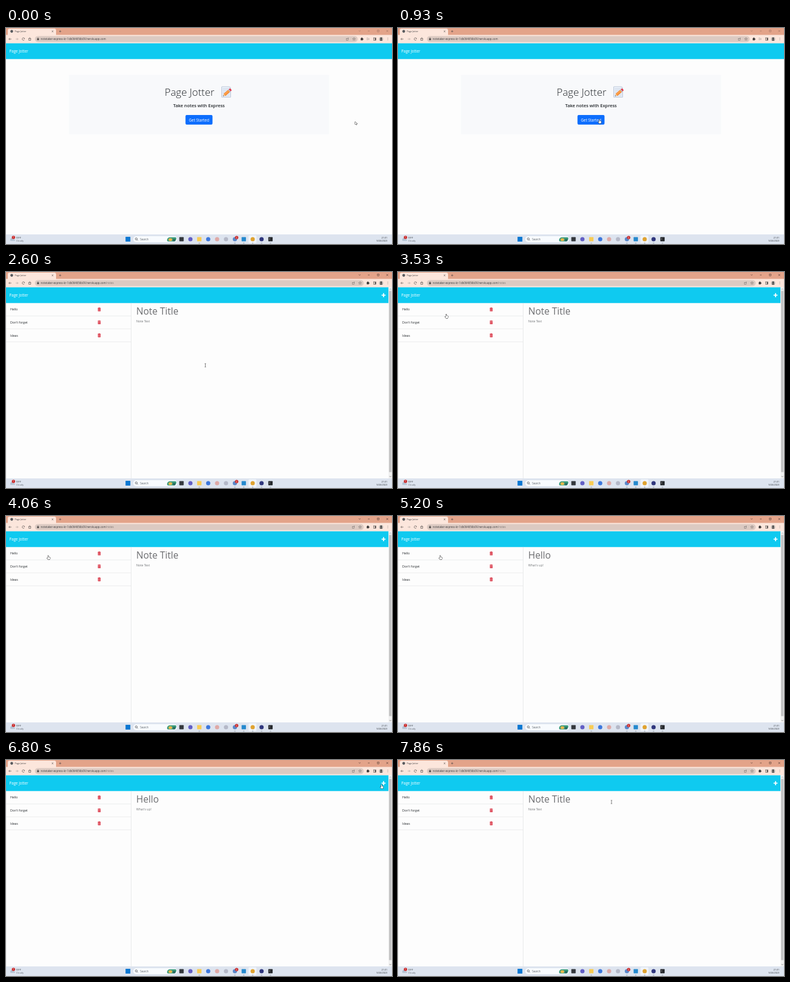
Animation, 640 px wide and 360 px high, one loop 8000 ms. Source, as an HTML page with a canvas:

```html
<!DOCTYPE html>
<html lang="en">
<head>
<meta charset="utf-8">
<title>Page Jotter</title>
<style>
html, body { margin: 0; width: 100%; height: 100%; overflow: hidden; background: #fdfdfd; }
canvas { display: block; width: 640px; height: 360px; }
</style>
</head>
<body>
<canvas id="stage"></canvas>
<script>
const canvas = document.getElementById('stage');
const ctx = canvas.getContext('2d');
const scale = Math.max(1, window.devicePixelRatio || 1);
canvas.width = 640 * scale;
canvas.height = 360 * scale;

const LOOP = 8000, FOCUS_AT = 1260, NAV_AT = 1400, OPEN_AT = 4730, CLEAR_AT = 7200;
const APP = 'Page Jotter';
const INK = '#3d3d3f', ICON = '#4a4645', CYAN = '#0fcaf0';
const START = { x: 579, y: 156 };
const moves = [
  { from: 330, to: 930, x: 334, y: 152.5 },
  { from: 1260, to: 2000, x: 330.5, y: 155.5 },
  { from: 2600, to: 3530, x: 80, y: 70.5 },
  { from: 3530, to: 4060, x: 70, y: 66 },
  { from: 5200, to: 6660, x: 622.5, y: 41 },
  { from: 7400, to: 7860, x: 354, y: 70 }
];

const clamp = p => Math.min(1, Math.max(0, p));
const ease = p => p * p * (3 - 2 * p);

function pointerAt(t) {
  return moves.reduce((at, m) => {
    const e = ease(clamp((t - m.from) / (m.to - m.from)));
    return { x: at.x + (m.x - at.x) * e, y: at.y + (m.y - at.y) * e };
  }, START);
}

function rect(x, y, w, h, color, r = 0) {
  ctx.fillStyle = color;
  ctx.beginPath();
  ctx.roundRect(x, y, w, h, r);
  ctx.fill();
}

function box(x, y, size, color) {
  ctx.strokeStyle = color;
  ctx.lineWidth = 0.6;
  ctx.strokeRect(x - size / 2, y - size / 2, size, size);
}

function disc(x, y, r, color) {
  ctx.fillStyle = color;
  ctx.beginPath();
  ctx.arc(x, y, r, 0, 7);
  ctx.fill();
}

function ring(x, y, r, color, from = 0, to = 7) {
  ctx.strokeStyle = color;
  ctx.lineWidth = 0.65;
  ctx.beginPath();
  ctx.arc(x, y, r, from, to);
  ctx.stroke();
}

function line(x1, y1, x2, y2, color, w = 0.6) {
  ctx.strokeStyle = color;
  ctx.lineWidth = w;
  ctx.beginPath();
  ctx.moveTo(x1, y1);
  ctx.lineTo(x2, y2);
  ctx.stroke();
}

// A right angle opening away from the direction it points in
function chevron(x, y, size, angle, color) {
  for (const side of [-1, 1]) {
    const a = angle + Math.PI + side * Math.PI / 4;
    line(x, y, x + size * Math.cos(a), y + size * Math.sin(a), color);
  }
}

function plus(x, y, r, color, w) {
  line(x - r, y, x + r, y, color, w);
  line(x, y - r, x, y + r, color, w);
}

function cross(x, y, r, color) {
  line(x - r, y - r, x + r, y + r, color);
  line(x - r, y + r, x + r, y - r, color);
}

function star(x, y, r, color) {
  ctx.beginPath();
  for (let i = 0; i < 10; i++) {
    const a = (i / 5 - 0.5) * Math.PI, d = i % 2 ? r * 0.45 : r;
    ctx.lineTo(x + d * Math.cos(a), y + d * Math.sin(a));
  }
  ctx.closePath();
  ctx.strokeStyle = color;
  ctx.lineWidth = 0.5;
  ctx.stroke();
}

function text(s, x, y, size, color, weight = 400, align = 'left') {
  ctx.font = `${weight} ${size}px "Open Sans", "Noto Sans", sans-serif`;
  ctx.textAlign = align;
  ctx.fillStyle = color;
  ctx.fillText(s, x, y);
}

function drawTabs(focused) {
  const c = focused ? '#40302a' : '#9b6f5e';
  rect(0, 0, 640, 12, '#e3a389');
  rect(3, 1, 80, 11, '#fce6dc', [3, 3, 0, 0]);
  disc(9.5, 5.6, 2.3, '#56595d');
  text(APP, 14.5, 7.1, 3.75, INK);
  cross(77.2, 5.6, 1.3, ICON);
  plus(89.8, 5.6, 1.8, ICON, 0.6);
  chevron(586.3, 5.6, 2.1, Math.PI / 2, c);
  line(600, 5, 603, 5, c);
  box(617.2, 5, 2.7, c);
  cross(632.2, 5, 1.5, c);
}

function drawToolbar(notes) {
  const y = 18.4;
  rect(0, 11.5, 640, 14, '#fce6dc');
  line(5, y, 9, y, ICON);
  chevron(4.7, y, 2.6, Math.PI, ICON);
  line(16, y, 20, y, '#a99f9b');
  chevron(20.1, y, 2.6, 0, '#a99f9b');
  ring(28.8, y, 2, ICON, 0.5, 5.5);
  disc(30.5, 17.4, 0.7, ICON);
  box(39.4, 19.2, 3, ICON);
  chevron(39.4, 16, 3.2, -Math.PI / 2, ICON);

  const end = notes ? 593 : 583;
  rect(48, 13.4, end - 48, 10, '#dccac2', 5);
  ring(53.1, 17.6, 1.1, ICON, Math.PI, 0);
  rect(51.6, 17.6, 3, 2.6, ICON, 0.4);
  const host = 'notetaker-express-kr-1db064656b09.herokuapp.com';
  text(host, 57.5, 20, 4.4, INK);
  if (notes) text('/notes', 57.5 + ctx.measureText(host).width, 20, 4.4, '#7c7572');
  box(end - 17.3, 19, 3, '#77716f');
  chevron(end - 15, 17, 1.6, 0, '#77716f');
  star(end - 6, y, 2.5, '#625d5b');

  const px = end + 7;
  rect(px - 1.9, 16.8, 3.7, 3.7, '#3e3a39', 0.4);
  disc(px, 16.6, 0.8, '#3e3a39');
  disc(px + 1.9, 18.6, 0.8, '#3e3a39');
  if (!notes) {
    for (let i = 0; i < 3; i++) line(598, 16.7 + i * 1.5, 600.3, 16.7 + i * 1.5, '#85807e', 0.5);
    line(601.7, 16.8, 601.7, 20, '#85807e');
  }
  box(611.3, 18.5, 3.8, ICON);
  rect(611.6, 16.6, 1.6, 3.8, ICON);
  disc(622, y, 3.3, '#b9b4b0');
  disc(622, 17.3, 1.3, '#2e2b2b');
  rect(620, 18.9, 4, 1.9, '#2e2b2b', [2, 2, 0, 0]);
  for (let i = -1; i < 2; i++) disc(633, y + i * 1.7, 0.45, ICON);
}

function drawMemo() {
  rect(357.3, 97.5, 15.5, 18.3, '#a5b3c9', [1, 4, 1, 1]);
  rect(357.9, 98.1, 14.3, 17.1, '#e4ebf5', [0.5, 3.5, 0.5, 0.5]);
  for (let i = 0; i < 5; i++) line(359.5, 101.5 + i * 2.9, 370.5, 101.5 + i * 2.9, '#bccadd', 0.5);
  ctx.save();
  ctx.translate(360, 113.5);
  ctx.rotate(-0.72);
  rect(0, -0.7, 3, 1.4, '#594b48', 0.7);
  rect(1, -1.5, 2.5, 3, '#f1cfa2', [1.5, 0, 0, 1.5]);
  rect(3, -2.3, 10.5, 4.6, '#f58b35');
  rect(3, -1, 10.5, 1.2, '#ffae55');
  rect(13, -2.3, 1.8, 4.6, '#b6bec9');
  rect(14.6, -2.3, 2.8, 4.6, '#e43b4c', [0, 1.5, 1.5, 0]);
  ctx.restore();
}

function drawHeader(width) {
  rect(0, 25.5, width, 26.3, CYAN);
  text(APP, 5.5, 41.2, 6.2, '#fff');
}

function drawHome() {
  drawHeader(640);
  rect(104.5, 78.3, 431, 99, '#f8f9fb', 1);
  text(APP, 263, 112.9, 16.9, '#212529', 300);
  drawMemo();
  text('Take notes with Express', 320, 132.4, 7.45, '#212529', 600, 'center');
  rect(297.6, 145.1, 44.8, 16, '#0d6efd', 2);
  text('Get Started', 320, 155.7, 6.35, '#fff', 400, 'center');
}

function drawRow(label, i) {
  const y = 62.3 + i * 21.6;
  text(label, 7, y + 2, 5.2, '#212529');
  rect(153.6, y - 3.2, 2, 1, '#d93848');
  rect(152, y - 2.6, 5.2, 1, '#d93848', 0.3);
  rect(152.4, y - 1.3, 4.4, 4.5, '#d93848', 0.6);
  for (let k = -1; k < 2; k++) line(154.6 + k * 1.1, y - 0.6, 154.6 + k * 1.1, y + 2.5, '#f3a7ae', 0.4);
  line(0, y + 10.9, 207.5, y + 10.9, '#dfe1e3');
}

function drawNotes(t) {
  const open = t >= OPEN_AT && t < CLEAR_AT;
  drawHeader(634.3);
  plus(626, 38.6, 3.3, '#fff', 1.7);
  rect(634.3, 25.5, 5.7, 318.7, '#f0f0f0');
  rect(635.1, 31.5, 4.1, 302, '#c2c2c3');
  chevron(637.2, 28, 2, -Math.PI / 2, '#888');
  chevron(637.2, 341.5, 2, Math.PI / 2, '#555');
  line(207.5, 51.8, 207.5, 344, '#dcdee0');
  line(0.3, 51.8, 0.3, 344, '#e3e5e7');
  ['Hello', 'Don\'t forget', 'Ideas'].forEach(drawRow);
  text(open ? 'Hello' : 'Note Title', 216, 71.2, 15.5, '#6b6c6f');
  text(open ? 'What\'s up!' : 'Note Text', 216, 84, 5.1, '#6f7275');
}

function badge(x, y, n) {
  disc(x, y, 2.8, '#cb3030');
  text(n, x, y + 1.4, 3.7, '#fff', 400, 'center');
}

function drawTaskbar() {
  const y = 352, clock = '#30353a';
  rect(0, 344, 640, 16, '#dde4ef');
  disc(9.5, 352.5, 2.2, '#a9b9cc');
  rect(7, 352.2, 8, 2.9, '#b8c6d6', 1.4);
  badge(12.4, 349, '1');
  text('59°F', 17, 350.5, 3.8, '#25292e');
  text('Cloudy', 17, 356.4, 3.8, '#5e656d');

  rect(198.2, 348, 8, 8, '#0c78d2', 0.5);
  rect(211, 347, 73, 10, '#f8fbfe', 5);
  ring(216, 351.5, 1.7, '#2d3035');
  line(217.2, 352.7, 218.8, 354.3, '#2d3035');
  text('Search', 222.3, 353.6, 4.4, '#5a6066');
  rect(267, 348.7, 15.5, 7, '#3d9c7c', [5, 2, 5, 2]);
  rect(269.5, 350.5, 6, 4.5, '#e9b84b', 2);
  rect(276.5, 351.5, 4.5, 4, '#286a61', 1.5);

  const slot = i => 291 + i * 14.75;
  rect(slot(7.98) - 6.5, 345.4, 13, 13, '#f0f4fa', 1.5);
  ['#33373c', '#625fc5', '#f8cc54', '#3c77dc', '#dfa9a6', '#b5b9c8',
    '#5b88c9', '#2589ce', '#e0a331', '#30377d', '#25282c'].forEach((color, i) => {
    const square = [0, 2, 7, 10].includes(i), x = slot(i);
    if (square) rect(x - 3.6, y - 3.4, 7.2, 6.8, color, 0.7);
    else disc(x, y, 3.5, color);
    if (i === 2 || i > 5) rect(x - 1.2, 358, 2.4, 0.8, '#818993', 0.4);
  });
  badge(382.4, 349.2, '2');
  chevron(437.5, 351.6, 1.6, 0, '#fff');

  text('21:01', 632.2, 350.6, 3.8, clock, 400, 'right');
  text('9/26/2023', 632.2, 356.3, 3.8, clock, 400, 'right');
}

function outlined(path) {
  ctx.lineJoin = 'round';
  ctx.strokeStyle = '#222';
  ctx.lineWidth = 1;
  ctx.stroke(path);
  ctx.fillStyle = '#fff';
  ctx.fill(path);
}

const arrow = new Path2D('M0 0V4.7L1.1 3.7L1.9 5.4L2.7 5L1.9 3.4H3.4Z');
const hand = new Path2D('M-.6 0H.5V2.4L3 3V4.5L2.4 6.6H-.5L-2.2 4L-.6 4.2Z');

function beam() {
  line(0, -2.8, 0, 2.8, '#333');
  for (const y of [-2.8, 2.8]) line(-1.2, y, 1.2, y, '#333', 0.5);
}

function drawPointer(t, notes) {
  const { x, y } = pointerAt(t);
  const onButton = !notes && Math.abs(x - 320) < 23 && Math.abs(y - 153) < 8;
  const onPlus = notes && y < 52 && x > 620;
  const onList = notes && x < 208 && y > 52 && y < 117;
  ctx.save();
  ctx.translate(x, y);
  if (onButton || onPlus || onList) outlined(hand);
  else if (notes && x > 208 && y > 52) beam();
  else outlined(arrow);
  ctx.restore();
}

function render(now) {
  const t = now % LOOP, notes = t >= NAV_AT;
  ctx.setTransform(scale, 0, 0, scale, 0, 0);
  rect(0, 0, 640, 360, '#fdfdfd');
  drawTabs(t >= FOCUS_AT);
  drawToolbar(notes);
  if (notes) drawNotes(t);
  else drawHome();
  drawTaskbar();
  drawPointer(t, notes);
}

const start = performance.now();
function tick() {
  render(performance.now() - start);
  requestAnimationFrame(tick);
}
tick();
</script>
</body>
</html>
```
